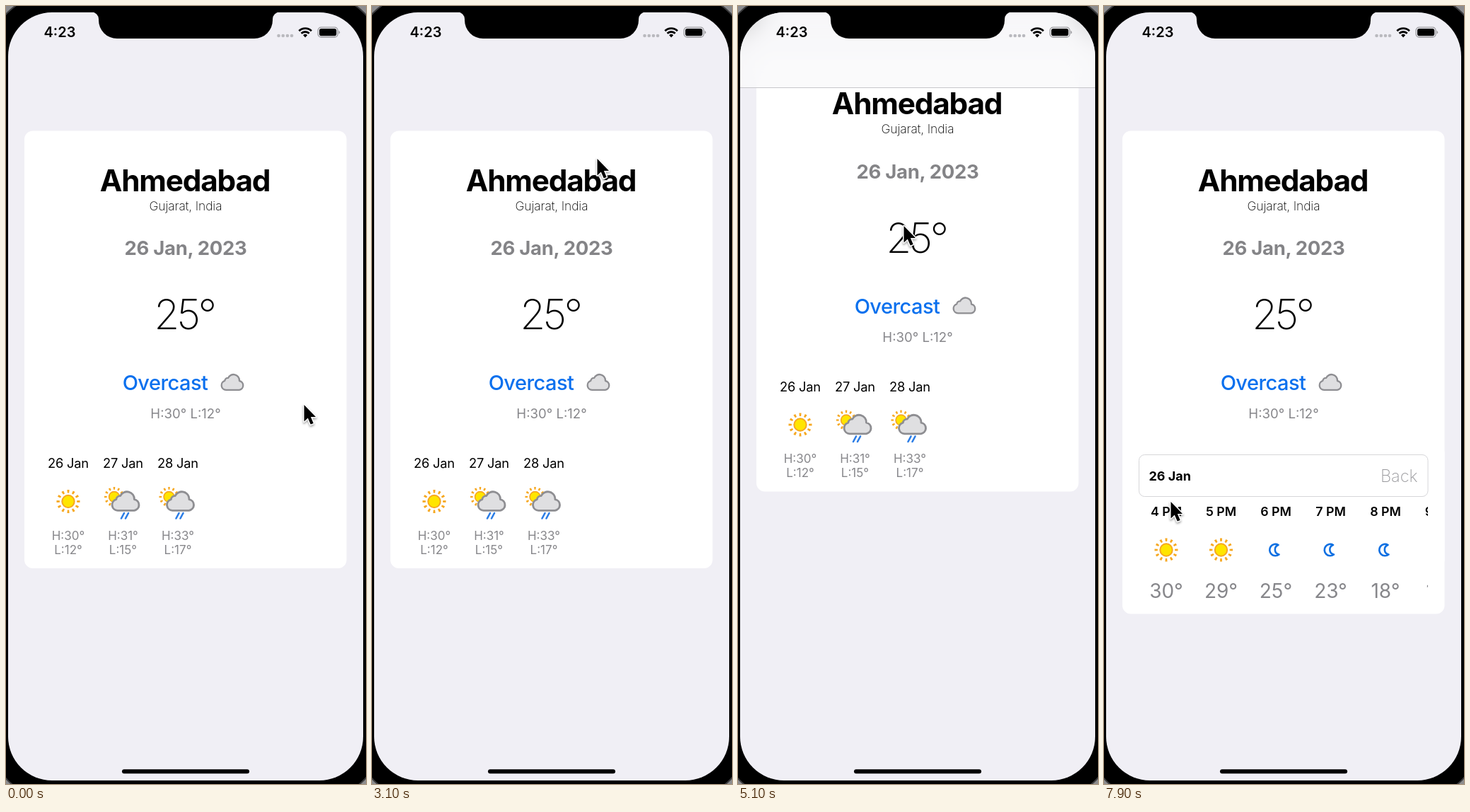
An HTML page for the animation above (8 s loop, 509 by 1100 pixels).

```html
<!DOCTYPE html>
<html lang="en">
<head>
<meta charset="utf-8">
<title>Weather card</title>
<style>
  html, body { margin: 0; width: 100%; height: 100%; overflow: hidden; background: #8d8d8f; }
  #stage { position: relative; width: 509px; height: 1100px; overflow: hidden; }
  svg { position: absolute; left: 0; top: 0; width: 509px; height: 1100px; overflow: visible; }
  .body {
    position: absolute; left: -24px; top: -18px; width: 556px; height: 1140px;
    border-radius: 89px; background: #000; border: 2px solid #3c3c3e; box-sizing: border-box;
  }
  .screen {
    position: absolute; left: 2.5px; top: 9px; width: 502.5px; height: 1086px;
    border-radius: 62px; overflow: hidden; background: #f0eff5;
  }
  .screen svg { left: -2.5px; top: -9px; }
  .bar {
    position: absolute; left: 0; top: 0; width: 100%; height: 106px;
    background: rgba(249, 249, 251, .82); backdrop-filter: blur(14px);
    border-bottom: 1px solid #c6c6ca;
  }

  text { font-family: Inter, sans-serif; font-optical-sizing: none; text-anchor: middle; }
  .title { font-size: 42.3px; font-weight: 700; letter-spacing: -1.2px; }
  .place { font-size: 17.4px; font-weight: 200; letter-spacing: -.1px; }
  .date { font-size: 27.5px; font-weight: 700; letter-spacing: -.3px; fill: #848487; }
  .now { font-size: 58.5px; font-weight: 150; letter-spacing: -3.5px; }
  .sky { font-size: 29px; font-weight: 500; letter-spacing: -.55px; fill: #0a70ee; }
  .range { font-size: 18.6px; fill: #87878b; }
  .day { font-size: 18.3px; letter-spacing: -.2px; }
  .small { font-size: 17px; fill: #87878b; }
  .head { font-size: 18px; font-weight: 700; text-anchor: start; }
  .back { font-size: 23.5px; font-weight: 200; fill: #98989c; text-anchor: end; }
  .hour { font-size: 17.8px; font-weight: 600; }
  .temp { font-size: 28px; fill: #87878b; }
  .clock { font-size: 20px; font-weight: 600; }

  .card, .bar, .hours, .cursor { animation: 8s step-end -5ms infinite; }
  .card { animation-name: scroll; }
  .bar { animation-name: bar; }
  .hours { animation-name: open; }
  .cursor { animation-name: point; }

  /* Rubber-band pull down, spring back, short push up, spring back */
  @keyframes scroll {
    0%, 38.75% { transform: translateY(0); }
    40% { transform: translateY(70px); }
    41.25% { transform: translateY(150px); }
    42.5% { transform: translateY(230px); }
    43.75% { transform: translateY(295px); }
    45% { transform: translateY(330px); }
    46.25% { transform: translateY(337.5px); }
    47.5% { transform: translateY(280px); }
    48.75% { transform: translateY(170px); }
    50% { transform: translateY(85px); }
    51.25% { transform: translateY(40px); }
    52.5% { transform: translateY(15px); }
    53.75% { transform: translateY(5px); }
    55%, 58.75% { transform: translateY(0); }
    60% { transform: translateY(-32px); }
    61.25% { transform: translateY(-66px); }
    62.5% { transform: translateY(-95px); }
    63.75% { transform: translateY(-108.500px); }
    65% { transform: translateY(-62px); }
    66.25% { transform: translateY(-18px); }
    67.5%, 100% { transform: translateY(0); }
  }
  @keyframes bar {
    0% { visibility: hidden; }
    60% { visibility: visible; }
    67.5%, 100% { visibility: hidden; }
  }
  @keyframes open {
    0% { opacity: 0; }
    97.5% { opacity: .5; }
    98.75%, 100% { opacity: 1; }
  }
  /* One step per 100 ms between the turning points */
  @keyframes point {
    0% { transform: translate(421px, 563px); animation-timing-function: steps(4); }
    5% { transform: translate(330px, 856px); animation-timing-function: steps(5); }
    11.25% { transform: translate(90px, 740px); }
    12.5% { transform: translate(52px, 705px); animation-timing-function: steps(4); }
    17.5% { transform: translate(298px, 700px); animation-timing-function: steps(4); }
    22.5% { transform: translate(60px, 700px); }
    23.75% { transform: translate(25px, 694px); }
    25% { transform: translate(40px, 690px); animation-timing-function: steps(3); }
    28.75% { transform: translate(124px, 689px); animation-timing-function: steps(4); }
    33.75% { transform: translate(371px, 560px); animation-timing-function: steps(3); }
    37.5% { transform: translate(320px, 134px); }
    38.75% { transform: translate(318px, 215px); animation-timing-function: steps(5); }
    45% { transform: translate(302px, 1075px); }
    46.25% { transform: translate(300px, 1106px); }
    47.5% { transform: translate(300px, 1106px); animation-timing-function: steps(7); }
    56.25% { transform: translate(203px, 587px); animation-timing-function: steps(2); }
    58.75% { transform: translate(216px, 525px); animation-timing-function: steps(4); }
    63.75% { transform: translate(234px, 310px); animation-timing-function: steps(3); }
    67.5% { transform: translate(225px, 300px); animation-timing-function: steps(6); }
    75% { transform: translate(95px, 697px); }
    88.75% { transform: translate(95px, 697px); animation-timing-function: steps(3); }
    92.5%, 100% { transform: translate(94px, 700px); }
  }
</style>
</head>
<body>
<div id="stage">
  <div class="body"></div>

  <div class="screen">
    <svg class="card" viewBox="0 0 509 1100">
      <defs>
        <g id="sun">
          <circle r="8.7" fill="#ffe500" stroke="#f6a821" stroke-width="2"/>
          <circle r="14.3" pathLength="36" fill="none" stroke="#f6a821" stroke-width="4.4" stroke-dasharray="1.15 1.85" stroke-dashoffset=".575"/>
        </g>
        <path id="cloud" d="M8 22.8A6.6 6.6 0 0 1 6.3 9.9A4.5 4.5 0 0 1 11 5.9A8.4 8.4 0 0 1 27 10A6.5 6.5 0 0 1 26.800 22.8Z" fill="#dfdfe1" stroke="#8e8e92" stroke-width="2.3" stroke-linejoin="round"/>
        <g id="shower">
          <use href="#sun" transform="translate(-12.5 -6) scale(.85)"/>
          <use href="#cloud" transform="translate(-17.5 -14.500) scale(1.24 1.22)"/>
          <path d="M1.5 17l-4 7.5M7.5 17l-4 7.5" stroke="#2b7de6" stroke-width="2.6" stroke-linecap="round"/>
        </g>
        <path id="moon" d="M5-7A8.2 8.2 0 1 0 6 6.5A7 7 0 0 1 5-7Z" fill="#fff" stroke="#0f70e2" stroke-width="2.6" stroke-linejoin="round"/>
        <clipPath id="row"><rect x="49" y="696" width="409" height="150"/></clipPath>
      </defs>

      <rect x="26" y="176.5" width="455.5" height="618.5" rx="12" fill="#fff"/>
      <text class="title" x="253" y="261.5">Ahmedabad</text>
      <text class="place" x="254" y="288.5">Gujarat, India</text>
      <text class="date" x="254" y="352">26 Jan, 2023</text>
      <text class="now" x="252" y="457">25°</text>
      <text class="sky" x="225" y="543">Overcast</text>
      <use href="#cloud" x="303" y="520"/>
      <text class="range" x="254" y="583">H:30° L:12°</text>

      <g>
        <text class="day" x="88" y="653">26 Jan</text>
        <use href="#sun" x="88" y="700.5"/>
        <text class="small" x="88" y="754.5">H:30°</text>
        <text class="small" x="88" y="774.5">L:12°</text>
        <text class="day" x="165.5" y="653">27 Jan</text>
        <use href="#shower" x="165.5" y="700"/>
        <text class="small" x="165.5" y="754.5">H:31°</text>
        <text class="small" x="165.5" y="774.5">L:15°</text>
        <text class="day" x="243" y="653">28 Jan</text>
        <use href="#shower" x="243" y="700"/>
        <text class="small" x="243" y="754.5">H:33°</text>
        <text class="small" x="243" y="774.5">L:17°</text>
      </g>

      <g class="hours">
        <rect x="26" y="620" width="455.5" height="239.5" rx="12" fill="#fff"/>
        <rect x="49.5" y="634.5" width="408.5" height="59" rx="8" fill="#fff" stroke="#d6d6d9"/>
        <text class="head" x="63.5" y="670.5">26 Jan</text>
        <text class="back" x="443.5" y="673">Back</text>
        <g clip-path="url(#row)">
          <text class="hour" x="88" y="721">4 PM</text>
          <use href="#sun" x="88" y="769"/>
          <text class="temp" x="88" y="837">30°</text>
          <text class="hour" x="165.5" y="721">5 PM</text>
          <use href="#sun" x="165.5" y="769"/>
          <text class="temp" x="165.5" y="837">29°</text>
          <text class="hour" x="243" y="721">6 PM</text>
          <use href="#moon" x="241.5" y="769"/>
          <text class="temp" x="243" y="837">25°</text>
          <text class="hour" x="320.5" y="721">7 PM</text>
          <use href="#moon" x="319" y="769"/>
          <text class="temp" x="320.5" y="837">23°</text>
          <text class="hour" x="398" y="721">8 PM</text>
          <use href="#moon" x="396.5" y="769"/>
          <text class="temp" x="398" y="837">18°</text>
          <text class="hour" x="475.5" y="721">9 PM</text>
          <text class="temp" x="475.5" y="837">17°</text>
        </g>
      </g>
    </svg>
    <div class="bar"></div>
  </div>

  <svg viewBox="0 0 509 1100">
    <path d="M121 8.5a10 10 0 0 1 10 10v1.5a26 26 0 0 0 26 26h194a26 26 0 0 0 26-26v-1.5a10 10 0 0 1 10-10z"/>
    <text class="clock" x="76" y="44">4:23</text>
    <g fill="#b9b9be">
      <circle cx="385.5" cy="42" r="2.3"/>
      <circle cx="391.7" cy="42" r="2.3"/>
      <circle cx="397.9" cy="42" r="2.3"/>
      <circle cx="404" cy="42" r="2.3"/>
    </g>
    <g fill="none" stroke="#000" stroke-width="2.8">
      <path d="M414.3 35.2a12.5 12.5 0 0 1 17.6 0"/>
      <path d="M417.5 38.8a8 8 0 0 1 11.2 0"/>
    </g>
    <path d="M423.1 44.5l-3-3.2a4.3 4.3 0 0 1 6 0z"/>
    <rect x="441.2" y="30.2" width="27.8" height="13.8" rx="4.3" fill="none" stroke="#98989c" stroke-width="1.3"/>
    <rect x="443" y="32" width="24.2" height="10.2" rx="2.8"/>
    <path d="M470.5 34.8a2.6 2.6 0 0 1 0 4.8z" fill="#98989c"/>
    <rect x="164" y="1079.3" width="180" height="6" rx="3"/>

    <g class="cursor">
      <path d="M.5 1V24.5L5.8 19.5L9.7 28.6L13.7 26.9L9.9 18H17Z" fill="#000" stroke="#fff" stroke-width="3" paint-order="stroke" stroke-linejoin="round" style="filter: drop-shadow(0 2px 1.5px rgba(0,0,0,.35))"/>
    </g>
  </svg>
</div>
</body>
</html>
```
